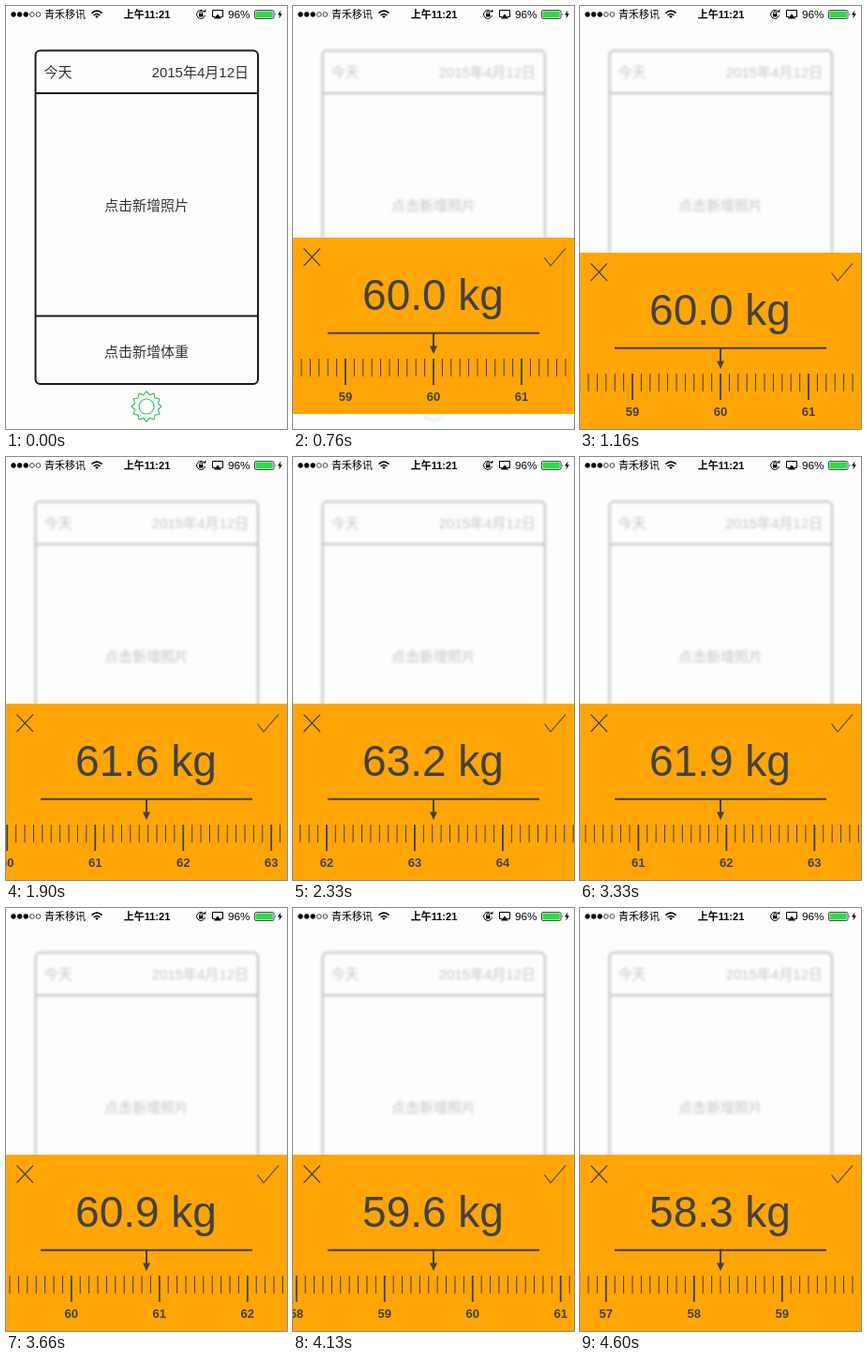
Write an HTML page that moves like this. It is 300 by 451 pixels and loops after 4630 ms.

```html
<!DOCTYPE html>
<html lang="zh-CN">
<head>
<meta charset="utf-8">
<title>体重</title>
<style>
  html, body { margin: 0; width: 100%; height: 100%; overflow: hidden; background: #fdfdfd; }
  svg { display: block; width: 100%; height: 100%; }
  text { font-family: "Liberation Sans", "Noto Sans CJK SC", "Noto Sans CJK", sans-serif; }
  .line { fill: none; stroke: #1c1c1e; stroke-width: 2; }
  .hint { font-size: 15px; font-weight: 300; fill: #333; }
  .mid { text-anchor: middle; }
  .status { font-size: 11px; fill: #000; }
  .thin { fill: none; stroke: #000; stroke-width: 1; }
  .green { fill: none; stroke: #3cc35f; stroke-width: 1.2; }
  .ink { fill: none; stroke: #414141; }
  #panel text { fill: #414141; }
  #value { font-size: 46px; }
  #ruler text { font-size: 13px; font-weight: bold; }
</style>
</head>
<body>
<svg viewBox="0 0 300 451">
  <rect width="300" height="451" fill="#fdfdfd"/>

  <g id="card">
    <rect class="line" x="31.5" y="47.5" width="237.5" height="355.5" rx="5"/>
    <path class="line" d="M31.5 93H269M31.5 330.5H269"/>
    <text class="hint" x="40.5" y="75.5">今天</text>
    <text class="hint" x="259" y="75.5" text-anchor="end">2015年4月12日</text>
    <text class="hint mid" x="150" y="217.5">点击新增照片</text>
    <text class="hint mid" x="150" y="373.5">点击新增体重</text>
    <path id="gear" class="green" stroke-linejoin="round"/>
    <circle class="green" cx="150" cy="427" r="8"/>
  </g>

  <g id="statusBar">
    <g id="signal"></g>
    <text class="status" x="41" y="13">青禾移讯</text>
    <g class="thin" stroke-width="1.6" style="stroke-width:1.6">
      <path d="M91.5 7.6Q97 2.8 102.5 7.6M93.6 10Q97 7 100.4 10"/>
      <path d="M95.2 11L97 13L98.8 11Q97 9.6 95.2 11Z" fill="#000" stroke="none"/>
    </g>
    <text class="status mid" x="150.5" y="13" font-weight="bold">上午11:21</text>
    <path class="thin" d="M211.5 6A4.5 4.5 0 1 0 212.5 10M206.8 8.5V7.2a1.4 1.4 0 0 1 2.8 0V8.5"/>
    <path d="M206 8.3h4.4v3.2h-4.4zM210.2 6.6h3.2v-3z"/>
    <path class="thin" d="M223 11.5h-2.5v-7h11v7h-2.5"/>
    <path d="M226 8.5l4.2 5h-8.4z"/>
    <text class="status" x="237" y="13" style="font-size:11.8px">96%</text>
    <rect class="thin" x="265.5" y="4.5" width="20.5" height="9" rx="1.5" style="stroke-width:.7"/>
    <rect x="266.5" y="5.5" width="18.3" height="7" rx=".5" fill="#32d74b"/>
    <path d="M287 7.5q1.3 1.5 0 3zM293.5 4.5l-3.5 5h2.2l-.9 4 3.6-5.2h-2.2z"/>
  </g>

  <g id="panel">
    <rect width="300" height="188" fill="#ffa506"/>
    <path class="ink" stroke-width="1.1" d="M11.5 11.5L29 30M29 11.5L11.5 30M268.5 21.5L275 30L291 11.5"/>
    <text id="value" class="mid" x="149.5" y="77"></text>
    <path class="ink" stroke-width="2" d="M37 101.7H263M150 102V118"/>
    <path d="M146 115.5h8L150 124z" fill="#414141"/>
    <g id="ruler"></g>
  </g>
</svg>

<script>
const LOOP = 4630, UNIT = 94, BASE = 60;
const $ = id => document.getElementById(id);

// Key points: [ms, value]
const slide = [[560, 188], [760, -16], [1140, 0], [LOOP, 0]];
const weight = [[0, 60], [1230, 60], [1900, 61.58], [2630, 63.85],
                [2830, 63.48], [3660, 60.856], [4600, 58.303], [LOOP, 58.22]];

// Smooth curve through the points that never overshoots them
function curve(points, t) {
  const last = points.length - 1;
  if (t <= points[0][0]) return points[0][1];
  if (t >= points[last][0]) return points[last][1];
  const secant = i => (points[i + 1][1] - points[i][1]) / (points[i + 1][0] - points[i][0]);
  const slope = i => {
    if (i === 0) return secant(0);
    if (i === last) return secant(last - 1);
    const a = secant(i - 1), b = secant(i);
    return a * b <= 0 ? 0 : 2 * a * b / (a + b);
  };
  const i = points.findIndex(p => p[0] > t) - 1;
  const [t0, v0] = points[i], [t1, v1] = points[i + 1];
  const h = t1 - t0, u = (t - t0) / h, w = 1 - u;
  return w * w * (1 + 2 * u) * v0 + u * u * (3 - 2 * u) * v1
       + h * u * w * (w * slope(i) - u * slope(i + 1));
}

function build() {
  let gear = "";
  for (let i = 0; i < 24; i++) {
    const r = i % 2 ? 12.8 : 16, a = i * Math.PI / 12;
    gear += (i ? "L" : "M") + (150 + r * Math.sin(a)) + " " + (427 - r * Math.cos(a));
  }
  $("gear").setAttribute("d", gear + "Z");

  let dots = "";
  for (let i = 0; i < 5; i++)
    dots += `<circle cx="${8 + i * 6.6}" cy="9" r="2.4" stroke="#000" stroke-width=".7" fill="${i < 3 ? "#000" : "none"}"/>`;
  $("signal").innerHTML = dots;

  let minor = "", major = "", labels = "";
  for (let n = 550; n <= 680; n++) {
    const x = 150 + (n / 10 - BASE) * UNIT;
    if (n % 10) {
      minor += `M${x} 129V148`;
    } else {
      major += `M${x} 129V157`;
      labels += `<text class="mid" x="${x}" y="174">${n / 10}</text>`;
    }
  }
  $("ruler").innerHTML = `<path class="ink" d="${minor}"/>
    <path class="ink" stroke-width="1.8" d="${major}"/>${labels}`;
}

function draw(t) {
  const kg = curve(weight, t);
  const fade = Math.min(1, Math.max(0, (t - 560) / 180));
  $("card").style.filter = fade ? `blur(${1.6 * fade}px)` : "none";
  $("card").style.opacity = 1 - 0.72 * fade;
  $("panel").setAttribute("transform", `translate(0 ${263 + curve(slide, t)})`);
  $("ruler").setAttribute("transform", `translate(${(BASE - kg) * UNIT} 0)`);
  $("value").textContent = kg.toFixed(1) + " kg";
}

function tick() {
  draw(performance.now() % LOOP);
  requestAnimationFrame(tick);
}

build();
tick();
</script>
</body>
</html>
```
